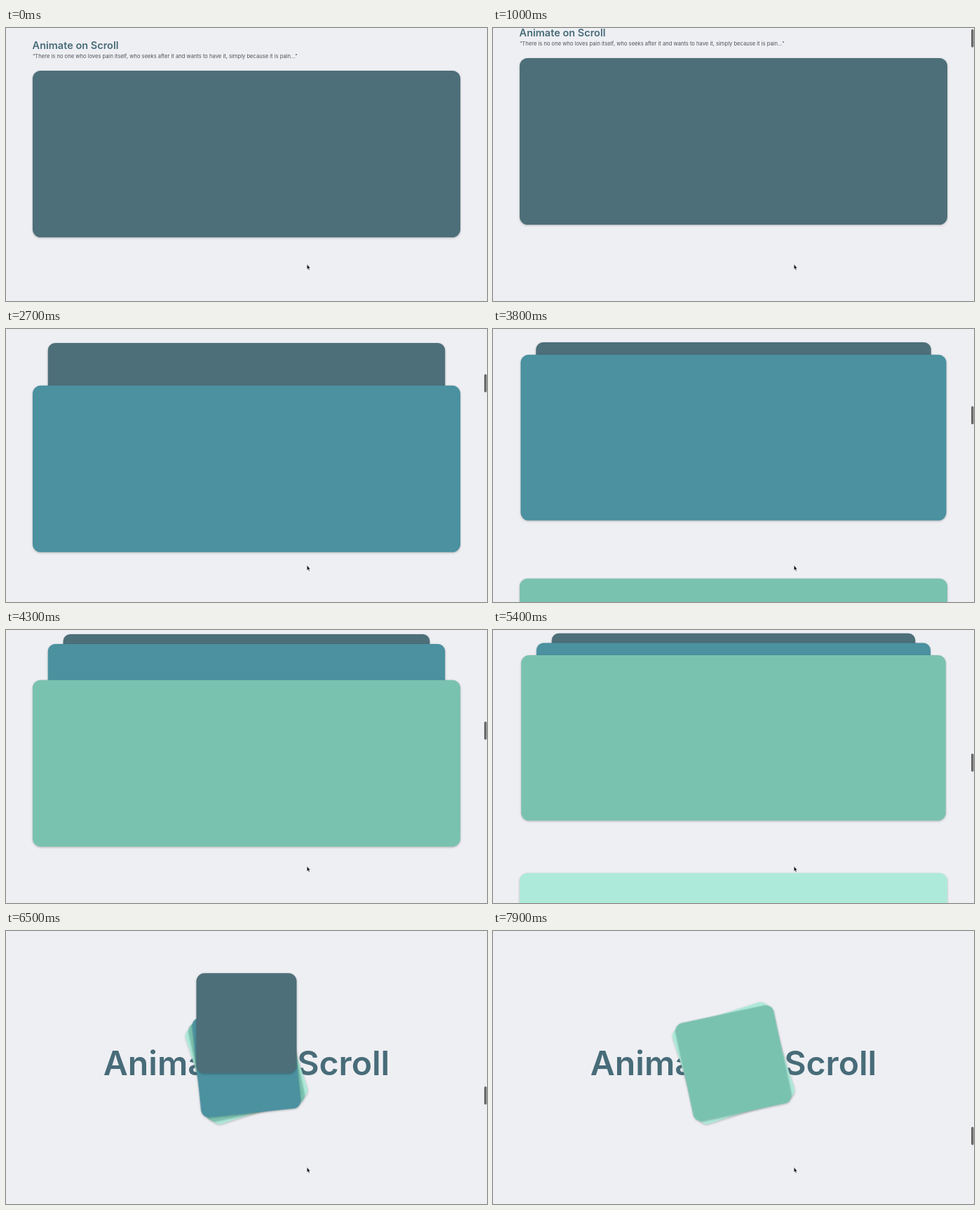
Write an HTML page that moves like this. It is 686 px wide and 390 px high and loops after 8 s.

```html
<!DOCTYPE html>
<html lang="en">
<head>
<meta charset="utf-8">
<title>Animate on Scroll</title>
<style>
  html, body { margin: 0; width: 100%; height: 100%; overflow: hidden; background: #eeeff3; }
  svg { display: block; width: 686px; height: 390px; }
  text { font-family: Inter, Roboto, sans-serif; }
  .heading { font-weight: 600; fill: #486c79; }
  .panel { filter: drop-shadow(0 1px 1.5px rgba(0, 0, 0, .25)); }
</style>
</head>
<body>
<svg viewBox="0 0 686 390">
  <g id="scene">
    <text class="heading" x="343" y="206" font-size="48.2" text-anchor="middle">Animate on Scroll</text>
    <g id="squares"></g>
  </g>
  <g id="header">
    <text class="heading" x="37.6" y="29.7" font-size="14.5">Animate on Scroll</text>
    <text x="38" y="42.8" font-size="7.6" fill="#505258">“There is no one who loves pain itself, who seeks after it and wants to have it, simply because it is pain...”</text>
  </g>
  <g id="cards"></g>
  <rect id="thumb" x="682" width="3.5" height="26" rx="1.75" fill="#696968"/>
  <path d="M429.2 337.6v7.2l1.6-1.4 1.2 2.7 1.2-.5-1.2-2.7h2.1z" fill="#111" stroke="#fff" stroke-width=".5" stroke-linejoin="round"/>
</svg>
<script>
const LOOP = 8000, STEP = 100;
const COLORS = ['#4d6f79', '#4b91a0', '#7ac2b0', '#aeead9'];
const CARD = { x: 38, top: 61, w: 610, h: 238, pin: 38, gap: 902.7 };
const SQUARE = { cx: 343, cy: 188.8, size: 143, gap: 491, tilt: -6 };
const SCENE_PIN = 2992;
const SCROLL_SPEED = 0.57; // px per ms

const byId = id => document.getElementById(id);
const clamp01 = v => Math.min(1, Math.max(0, v));
const move = (node, transform) => node.setAttribute('transform', transform);

function addPanel(parent, color, w, h) {
  const rect = document.createElementNS('http://www.w3.org/2000/svg', 'rect');
  const attrs = { x: -w / 2, y: -h / 2, width: w, height: h, rx: 11.5, fill: color, class: 'panel' };
  for (const name in attrs) rect.setAttribute(name, attrs[name]);
  parent.append(rect);
  return rect;
}

const cards = COLORS.map(c => addPanel(byId('cards'), c, CARD.w, CARD.h));
// The first square lies on top of the pile.
const squares = [...COLORS].reverse()
  .map(c => addPanel(byId('squares'), c, SQUARE.size, SQUARE.size)).reverse();

function scrollAt(t) {
  if (t < 900) return 0;
  if (t < 1000) return 9;
  if (t < 1200) return 18;
  return SCROLL_SPEED * (t - 1151);
}

function drawCards(scroll) {
  const flow = cards.map((_, i) => CARD.top + CARD.gap * i - scroll);
  const release = Math.min(0, flow[cards.length - 1] - CARD.pin);
  cards.forEach((card, i) => {
    // Each later card that enters pushes this one a level back.
    const depth = flow.slice(i + 1).reduce((sum, y) => sum + clamp01((376 - y) / 288), 0);
    const cy = Math.max(CARD.pin, flow[i]) + release + CARD.h / 2;
    move(card, `translate(343 ${cy}) scale(${1 - depth / 14}) translate(0 ${-0.12 * CARD.h * depth})`);
  });
}

function drawScene(scroll) {
  move(byId('scene'), `translate(0 ${Math.max(0, SCENE_PIN - scroll)})`);
  squares.forEach((square, i) => {
    const rise = Math.max(0, scroll - SCENE_PIN - SQUARE.gap * i);
    move(square, `translate(${SQUARE.cx} ${SQUARE.cy}) rotate(${SQUARE.tilt * i}) translate(0 ${-rise})`);
  });
}

function draw(now) {
  const t = Math.floor(now % LOOP / STEP) * STEP;
  const scroll = scrollAt(t);
  move(byId('header'), `translate(0 ${-scroll})`);
  drawCards(scroll);
  drawScene(scroll);
  byId('thumb').setAttribute('y', scroll / 13.77 + 0.5);
  byId('thumb').setAttribute('visibility', scroll ? 'visible' : 'hidden');
}

let start;
function tick(now) {
  start ??= now;
  draw(now - start);
  requestAnimationFrame(tick);
}
draw(0);
requestAnimationFrame(tick);
</script>
</body>
</html>
```
